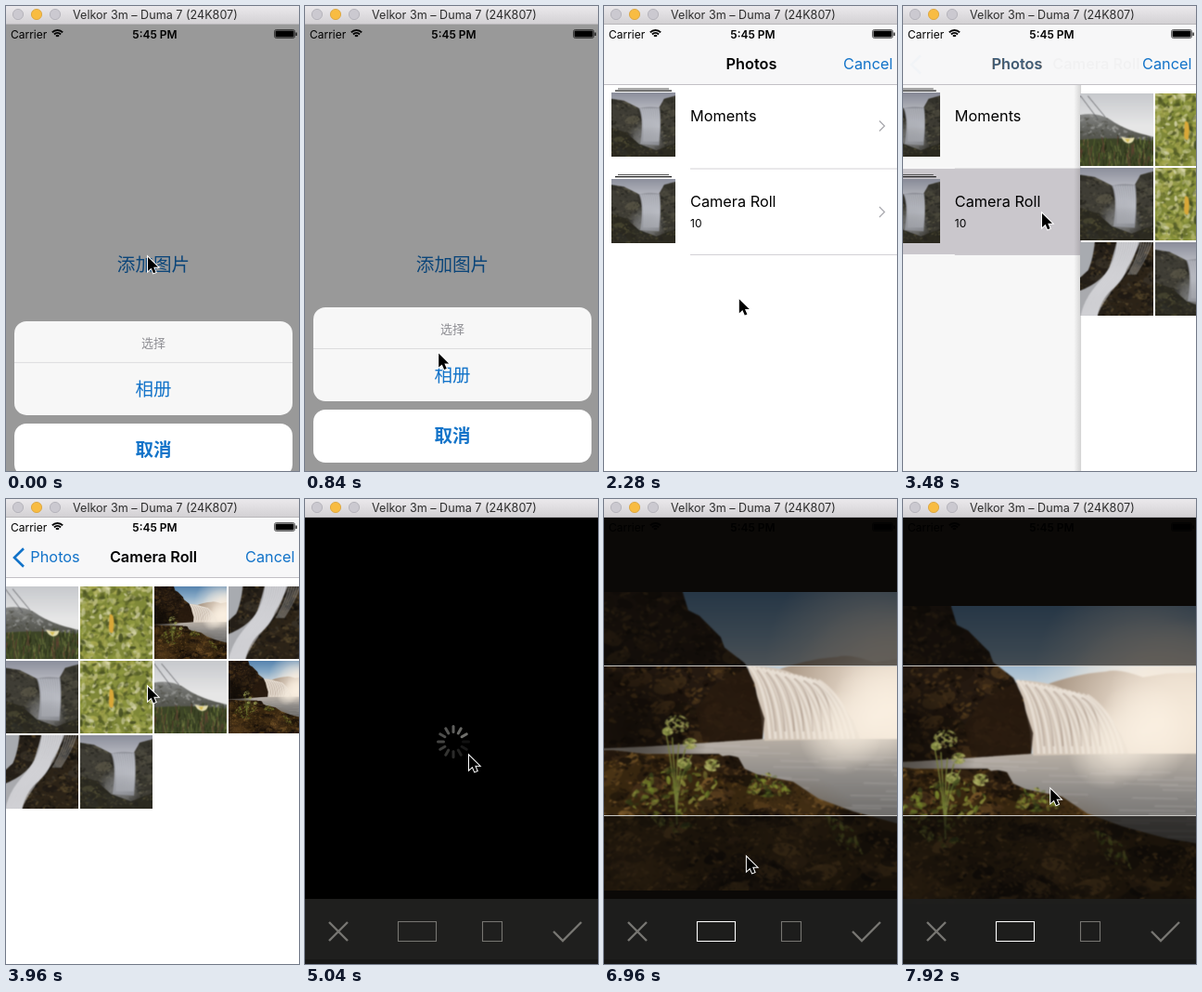
Animation of 316x500 px, one loop 8 s. Source, as an HTML page with a canvas:

```html
<!DOCTYPE html>
<html lang="en">
<head>
<meta charset="utf-8">
<title>Photo picker</title>
<style>
  html, body { margin: 0; width: 100%; height: 100%; overflow: hidden; background: #fff; }
  canvas { display: block; width: 316px; height: 500px; }
</style>
</head>
<body>
<canvas id="stage"></canvas>
<script>
const W = 316, H = 500, LOOP = 8000, BLUE = '#1273c9';
const UI = 'Inter, sans-serif', CJK = '"Noto Sans CJK SC", "Noto Sans CJK", sans-serif';
const canvas = document.getElementById('stage');
const ratio = window.devicePixelRatio || 1;
canvas.width = W * ratio;
canvas.height = H * ratio;
const c = canvas.getContext('2d');
c.imageSmoothingQuality = 'high';

const clamp = v => Math.max(0, Math.min(1, v));
const mix = (a, b, p) => a + (b - a) * p;
const easeOut = (t, start, end) => 1 - (1 - clamp((t - start) / (end - start))) ** 2;
const smooth = p => p * p * (3 - 2 * p);

function random(seed) {
  return () => (seed = (seed * 16807) % 2147483647) / 2147483647;
}

// ---- Photos -------------------------------------------------------------

function photo(w, h, paint) {
  const cv = document.createElement('canvas');
  cv.width = w * 2;
  cv.height = h * 2;
  const g = cv.getContext('2d');
  g.scale(2, 2);
  paint(g, random(w * 31 + h));
  // Lay a soft copy on top so that the flat shapes blend.
  g.filter = 'blur(1.6px)';
  g.drawImage(cv, 0, 0, w, h);
  return cv;
}

function gradient(g, y0, y1, ...colors) {
  const fill = g.createLinearGradient(0, y0, 0, y1);
  colors.forEach((color, i) => fill.addColorStop(i / (colors.length - 1), color));
  return fill;
}

function shape(g, d, fill) {
  g.fillStyle = fill;
  g.fill(new Path2D(d));
}

function glow(g, x, y, r, rgb, alpha) {
  const fill = g.createRadialGradient(x, y, 0, x, y, r);
  fill.addColorStop(0, `rgba(${rgb},${alpha})`);
  fill.addColorStop(.5, `rgba(${rgb},${alpha * .6})`);
  fill.addColorStop(1, `rgba(${rgb},0)`);
  g.fillStyle = fill;
  g.fillRect(x - r, y - r, 2 * r, 2 * r);
}

// Scatter small tilted blots inside a path.
function speckle(g, rnd, d, [x, y, w, h], count, size, colors, tilt = 1) {
  g.save();
  g.clip(new Path2D(d));
  for (let i = 0; i < count; i++) {
    g.fillStyle = colors[Math.floor(rnd() * colors.length)];
    g.globalAlpha = .35 + rnd() * .5;
    g.beginPath();
    const r = size * (.3 + rnd());
    g.ellipse(x + rnd() * w, y + rnd() * h, r, r * .5, (rnd() - .5) * 2 * tilt, 0, 7);
    g.fill();
  }
  g.restore();
}

// Dark mass with broad lumps, lit grains and deep cracks.
function rock(g, rnd, d, box, base, lights, darks, grain) {
  const area = box[2] * box[3], count = area / (grain * grain * 3);
  shape(g, d, base);
  speckle(g, rnd, d, box, count / 14, grain * 5, [...lights, ...darks, ...darks], .6);
  speckle(g, rnd, d, box, count, grain, [...lights, ...darks]);
}

function strokes(g, count, color, width, line) {
  g.strokeStyle = color;
  g.lineWidth = width;
  for (let i = 0; i < count; i++) {
    g.beginPath();
    line(i / (count - 1));
    g.stroke();
  }
}

const sunset = photo(480, 320, (g, rnd) => {
  g.fillStyle = gradient(g, 0, 95, '#5582ad', '#86a9c6', '#cdd6dc');
  g.fillRect(0, 0, 480, 320);
  glow(g, 375, 75, 120, '246,238,226', .8);
  shape(g, 'M262 86Q300 72 332 70Q345 66 372 76L398 72L480 70V175H262Z', '#ad9b89');
  glow(g, 390, 125, 115, '250,238,224', 1);
  glow(g, 440, 120, 110, '246,234,218', 1);
  g.fillStyle = gradient(g, 156, 250, '#b9b0a6', '#8a8784', '#666563');
  g.fillRect(0, 158, 480, 162);
  strokes(g, 40, 'rgba(205,201,196,.16)', 2, p => {
    const x = 130 + rnd() * 300, y = 164 + p * 85;
    g.moveTo(x, y);
    g.lineTo(x + 40 + rnd() * 60, y + 1);
  });
  shape(g, 'M235 79Q268 80 285 88Q316 94 338 122Q352 140 356 158L254 160Q250 112 235 79Z', '#d3c6b8');
  strokes(g, 16, 'rgba(255,250,243,.45)', 3, p => {
    g.moveTo(237 + p * 75, 79 + p * 16);
    g.quadraticCurveTo(256 + p * 85, 100 + p * 14, 260 + p * 90, 158);
  });
  strokes(g, 7, 'rgba(120,98,80,.3)', 2, p => {
    g.moveTo(246 + p * 60, 84 + p * 14);
    g.quadraticCurveTo(263 + p * 62, 106, 266 + p * 60, 150);
  });
  glow(g, 335, 152, 45, '246,236,222', .75);
  glow(g, 372, 135, 55, '250,240,226', .8);

  const earth = ['#66481f', '#49321a', '#7d5a2b'], deep = ['#0f0a06', '#1a120a', '#24180d'];
  const cliff = 'M0 0H166L172 20L184 26L207 49L211 60L233 77L243 98L251 136L252 158L192 162L130 166L0 172Z';
  rock(g, rnd, cliff, [0, 0, 255, 170], '#241910', ['#4e371b', '#3a2814', '#5c421f'], deep, 3);
  shape(g, 'M180 128L200 100L236 82L254 136L252 158L188 161Z', 'rgba(40,27,15,.85)');
  glow(g, 110, 145, 85, '10,7,4', .7);

  const shore = 'M0 172L90 170L126 174L205 174L228 188L246 196L285 204L312 222L350 236L398 249L480 262V320H0Z';
  rock(g, rnd, shore, [0, 168, 480, 152], '#37260f', earth, deep, 2.8);
  glow(g, 120, 298, 60, '112,78,36', .45);
  glow(g, 290, 265, 70, '100,70,34', .35);
  ['M186 314Q210 280 256 284Q286 298 292 320H180Z', 'M220 248Q244 226 272 234L286 250Q252 258 220 248Z',
    'M196 190Q204 170 226 178L236 196Q212 200 196 190Z'].forEach(d =>
    rock(g, rnd, d, [180, 170, 120, 150], '#2b1d0f', ['#4d361b', '#5e4320'], deep, 2.4));

  const greens = ['#7f8c2f', '#5b6a22', '#989c42', '#37431a', '#2f3514'];
  strokes(g, 5, '#747b38', 1.3, p => {
    g.moveTo(160, 250);
    g.quadraticCurveTo(158, 205, 148 + p * 28, 150 + p * 25);
  });
  [[160, 142, 13], [174, 163, 8], [198, 186, 9], [150, 150, 6], [168, 184, 8]].forEach(([x, y, r]) =>
    speckle(g, rnd, `M${x - r} ${y}a${r} ${r * .75} 0 1 0 ${2 * r} 0a${r} ${r * .75} 0 1 0 ${-2 * r} 0`,
      [x - r, y - r, 2 * r, 2 * r], 90, 2.4, ['#9a9e52', '#77823a', '#b7b56c']));
  speckle(g, rnd, 'M104 226L132 194L175 180L205 204L188 228L180 252L150 262L134 244Z', [104, 180, 100, 82], 240, 4, greens, 1.5);
  speckle(g, rnd, 'M234 216L244 194L264 194L284 216L262 222Z', [234, 194, 50, 28], 110, 3, greens, 1.5);
  speckle(g, rnd, 'M318 238L336 246L350 256L360 282L334 274Z', [318, 238, 42, 44], 90, 3.2, greens, 1.5);
});

const meadow = photo(100, 100, (g, rnd) => {
  g.fillStyle = gradient(g, 0, 45, '#c6c8cc', '#e6e6e6');
  g.fillRect(0, 0, 100, 100);
  const hill = 'M0 30Q22 26 40 36Q62 52 100 60V100H0Z';
  shape(g, hill, gradient(g, 26, 72, '#8a8b8a', '#63645f', '#4a4b42'));
  speckle(g, rnd, hill, [0, 28, 100, 44], 220, 2.5, ['#8e8f8b', '#585850', '#9b9c99', '#45463c']);
  strokes(g, 2, '#55565a', .8, p => { g.moveTo(p * 10, 4); g.lineTo(24 + p * 10, 36 - p * 3); });
  shape(g, 'M0 64Q50 60 100 66V100H0Z', '#3c4426');
  for (const color of ['#58672f', '#757d42', '#272d17', '#5f4131', '#454f28'])
    strokes(g, 40, color, 1, () => {
      const x = rnd() * 100, y = 70 + rnd() * 34;
      g.moveTo(x, y);
      g.lineTo(x + rnd() * 6 - 3, y - 7 - rnd() * 7);
    });
  shape(g, 'M56 60Q65 63 74 61Q73 69 65 69Q58 67 56 60Z', '#e4dcae');
  shape(g, 'M61 63h7l-3 5z', '#d5bd55');
});

const leaves = photo(100, 101, (g, rnd) => {
  g.fillStyle = '#7f8838';
  g.fillRect(0, 0, 100, 101);
  speckle(g, rnd, 'M0 0H100V101H0Z', [0, 0, 100, 101], 520, 5,
    ['#a9ac58', '#8f993f', '#535c24', '#c9c78a', '#424a20', '#aead52', '#d8d6ae'], 1.6);
  shape(g, 'M41 40Q46 37 47 49L46 64Q41 67 40 58Z', '#d9a838');
});

const stream = photo(101, 100, (g, rnd) => {
  const all = 'M0 0H101V100H0Z', lights = ['#4a3c28', '#5a4a2c', '#3b352a'], darks = ['#110f0c', '#1b1712', '#26211a'];
  rock(g, rnd, all, [0, 0, 101, 100], '#241e17', lights, darks, 2.4);
  shape(g, 'M50 0H82Q74 20 64 36Q60 52 42 66Q28 80 24 100H0V66Q30 54 40 34Q46 16 50 0Z', '#a9aaae');
  shape(g, 'M0 0H20Q18 22 11 38L0 48Z', '#a8abb0');
  strokes(g, 9, 'rgba(245,246,250,.5)', 2.6, p => {
    g.moveTo(52 + p * 26, 0);
    g.bezierCurveTo(48 + p * 20, 50, 12 + p * 30, 55, 2 + p * 20, 100);
  });
  rock(g, rnd, 'M42 68L66 42L82 22L101 12V100H30Z', [30, 12, 71, 88], '#2c2317', lights, darks, 2.4);
  strokes(g, 5, 'rgba(220,222,226,.35)', 2, p => {
    g.moveTo(84 + p * 14, 0);
    g.quadraticCurveTo(80 + p * 12, 20, 66 + p * 10, 44);
  });
});

const falls = photo(102, 102, (g, rnd) => {
  g.fillStyle = gradient(g, 0, 30, '#8b8e9b', '#bcbdc4');
  g.fillRect(0, 0, 102, 102);
  const lights = ['#5b5848', '#4d4a3e'], darks = ['#26251f', '#32312a'];
  rock(g, rnd, 'M0 10L20 13L44 25L76 24L84 10L102 5V102H0Z', [0, 5, 102, 97], '#3f3d35', lights, darks, 2.4);
  shape(g, 'M44 25Q60 21 77 24Q80 50 76 84L46 82Q52 45 44 25Z', gradient(g, 24, 84, '#90929a', '#a9abb2', '#7e8086'));
  strokes(g, 9, 'rgba(222,224,232,.38)', 2.6, p => {
    g.moveTo(47 + p * 27, 25);
    g.quadraticCurveTo(54 + p * 23, 40, 52 + p * 22, 78);
  });
  glow(g, 55, 76, 32, '160,162,168', .7);
  rock(g, rnd, 'M0 56L24 64L44 82L72 92L102 80V102H0Z', [0, 56, 102, 46], '#2c2a20', ['#49452f', '#545036'], darks, 2.2);
});

const roll = [meadow, leaves, sunset, stream, falls, leaves, meadow, sunset, stream, falls];

function thumb(img, x, y, size) {
  const side = Math.min(img.width, img.height);
  c.drawImage(img, (img.width - side) / 2, (img.height - side) / 2, side, side, x, y, size, size);
}

// ---- Drawing helpers ----------------------------------------------------

function rect(x, y, w, h, fill) {
  c.fillStyle = fill;
  c.fillRect(x, y, w, h);
}

function panel(x, y, w, h, r, fill) {
  c.fillStyle = fill;
  c.beginPath();
  c.roundRect(x, y, w, h, r);
  c.fill();
}

function text(str, x, y, size, color, { weight = 400, align = 'left', family = UI } = {}) {
  c.font = `${weight} ${size}px ${family}`;
  c.textAlign = align;
  c.textBaseline = 'middle';
  c.fillStyle = color;
  c.fillText(str, x, y);
}

function line(d, color, width) {
  c.strokeStyle = color;
  c.lineWidth = width;
  c.stroke(new Path2D(d));
}

function at(x, y, draw, alpha = 1) {
  c.save();
  c.translate(x, y);
  c.globalAlpha *= alpha;
  draw();
  c.restore();
}

// ---- Screens ------------------------------------------------------------

function titleBar() {
  rect(0, 0, W, 20, gradient(c, 0, 20, '#ebe9ec', '#d2d0d3'));
  rect(0, 19, W, 1, '#b9b7ba');
  ['#cbc9d0', '#f8bc42', '#cbc9d0'].forEach((color, i) => {
    c.beginPath();
    c.arc(13 + 20 * i, 9, 5.6, 0, 7);
    c.fillStyle = color;
    c.fill();
    c.strokeStyle = i === 1 ? '#d9a035' : '#aeacb4';
    c.lineWidth = .8;
    c.stroke();
  });
  text('Velkor 3m – Duma 7 (24K807)', 72, 10, 12.6, '#2c2c2c');
}

function statusBar() {
  text('Carrier', 5, 31, 12, '#000');
  text('5:45 PM', 160.5, 31, 12, '#000', { weight: 600, align: 'center' });
  [2, 5, 8].forEach(r => {
    c.beginPath();
    c.arc(55.5, 34, r, -Math.PI * .75, -Math.PI * .25);
    c.strokeStyle = '#000';
    c.lineWidth = 2;
    c.stroke();
  });
  c.beginPath();
  c.roundRect(289.5, 25.5, 22, 9, 2);
  c.lineWidth = .6;
  c.stroke();
  panel(290.5, 26.5, 20, 7, 1, '#000');
  rect(312.5, 28.5, 1.2, 3.5, '#000');
}

function actionSheet(y, pressed) {
  at(0, y, () => {
    panel(9, 324, 300, 101, 13, 'rgba(250,250,250,.97)');
    if (pressed) panel(9, 369, 300, 56, [0, 0, 13, 13], '#e2e1e4');
    rect(9, 368, 300, 1, '#dcdcde');
    const centered = { align: 'center', family: CJK };
    text('选择', 159, 347, 13, '#8f8f94', centered);
    text('相册', 159, 397, 19.5, BLUE, { ...centered, weight: 500 });
    panel(9, 434, 300, 57, 13, '#fff');
    text('取消', 159, 462, 19.5, BLUE, { ...centered, weight: 700 });
  });
}

function albumRow(y, name, count, selected) {
  if (selected) rect(0, y, W, 92, '#d0cdd3');
  rect(15, y + 6, 55, 1, '#555');
  rect(12, y + 8, 61, 1.3, '#222');
  thumb(falls, 8, y + 10.5, 69);
  text(name, 93, y + 36.5, 16.3, '#000');
  if (count) text(count, 93, y + 59.5, 12, '#000');
  line(`M297 ${y + 41}l5.5 5.5l-5.5 5.5`, '#a9a9ae', 1.3);
  rect(93, y + 92, W, 1, '#d3d1d6');
}

function navBar(push) {
  rect(0, 20, W, 64, '#f7f7f8');
  rect(0, 84, W, 1, '#c2c0c5');
  const title = { weight: 600, align: 'center' };
  const fade = smooth(push), arrive = push ** 4, x = mix(159, 53, fade), y = 63;
  at(x, y, () => text('Photos', 0, 0, 16.3, '#000', title), 1 - fade);
  at(x, y, () => text('Photos', 0, 0, 16.3, BLUE, { align: 'center' }), fade);
  at(0, y, () => line('M19 -9.7L9 0L19 9.7', BLUE, 2.6), arrive);
  at(mix(240, 159, push), y, () => text('Camera Roll', 0, 0, 16.3, '#000', title), arrive);
  text('Cancel', 258, y, 16.3, BLUE);
}

function picker(t) {
  const push = easeOut(t, 3393, 3793);
  rect(0, 20, W, 480, '#fff');
  at(-95 * push, 0, () => {
    albumRow(82.5, 'Moments');
    albumRow(175, 'Camera Roll', '10', t > 3220);
  });
  if (push > 0) {
    const x = W * (1 - push);
    rect(0, 84, x, 416, `rgba(0,0,0,${.08 * push})`);
    at(x, 0, () => {
      const shadow = c.createLinearGradient(-8, 0, 0, 0);
      shadow.addColorStop(0, 'rgba(0,0,0,0)');
      shadow.addColorStop(1, `rgba(0,0,0,${.25 * (1 - push)})`);
      rect(-8, 84, 8, 416, shadow);
      rect(0, 84, W, 416, '#fff');
      roll.forEach((img, i) => thumb(img, -.8 + 80.3 * (i % 4), 93.5 + 80.4 * Math.floor(i / 4), 78.5));
    });
  }
  navBar(push);
}

function spinner(t) {
  const head = 2 + Math.floor((t - 5000) / 83.4);
  for (let i = 0; i < 12; i++) {
    const age = (((head - i) % 12) + 12) % 12;
    at(160, 261, () => {
      c.rotate(i * Math.PI / 6);
      panel(-1.5, -18, 3, 9, 1.5, `rgba(150,150,146,${.75 - age * .058})`);
    });
  }
}

function cropper(t) {
  const loaded = t > 5150;
  rect(0, 20, W, 480, loaded ? '#0c0b09' : '#000');
  const square = t > 5720 && t < 6680;
  if (loaded) {
    const grow = easeOut(t, 5720, 5870);
    const zoom = mix(2 / 3, 1, grow);
    const half = 80.5 * (1 + grow - easeOut(t, 6680, 6880));
    const drag = t > 7200 ? cursorAt(t) : [192, 296];
    const w = 482 * zoom, h = 321 * zoom;
    c.drawImage(sunset, 159 - w / 2 + drag[0] - 192, 260 - h / 2 + drag[1] - 296, w, h);
    rect(0, 20, W, 240 - half, 'rgba(10,9,8,.62)');
    rect(0, 260 + half, W, 240 - half, 'rgba(10,9,8,.62)');
    line(`M0 ${260 - half}H316M0 ${260 + half}H316`, '#c9c8c5', 1);
  } else spinner(t);
  rect(0, 430, W, 70, loaded ? 'rgba(31,31,30,.96)' : '#1f1f1e');
  rect(0, 495, W, 5, '#181817');
  const idle = '#777672';
  line('M26 455L46 475M46 455L26 475M268 465L278 475L298 455', idle, 2.4);
  line('M100.5 454.5h41v21h-41z', loaded && !square ? '#fff' : idle, 1.1);
  line('M191.5 454.5h21v21h-21z', square ? '#fff' : idle, 1.1);
}

// ---- Pointer ------------------------------------------------------------

const pointerPath = [
  [0, 153, 270], [240, 153, 270], [1080, 142, 399], [1700, 142, 399], [2900, 150, 223],
  [3620, 150, 223], [3960, 153, 202], [4380, 196, 138], [4560, 196, 138], [5040, 177, 276],
  [5640, 197, 465], [5960, 197, 465], [6540, 120, 464], [6740, 120, 464], [7200, 192, 296], [7960, 159, 312]
];

function cursorAt(t) {
  const i = pointerPath.findIndex(key => key[0] > t);
  if (i < 0) return [159, 312];
  const [t0, x0, y0] = pointerPath[i - 1], [t1, x1, y1] = pointerPath[i];
  const p = smooth((t - t0) / (t1 - t0));
  return [mix(x0, x1, p), mix(y0, y1, p)];
}

function pointer(t) {
  at(...cursorAt(t), () => {
    const arrow = 'M0 0V15L3.6 11.8L6 17.3L8.6 16.2L6.2 10.8H11Z';
    line(arrow, '#fff', 2);
    shape(c, arrow, '#000');
  });
}

// ---- Timeline -----------------------------------------------------------

function draw(t) {
  c.setTransform(ratio, 0, 0, ratio, 0, 0);
  rect(0, 0, W, H, '#fff');
  text('添加图片', 159, 278, 19.6, BLUE, { align: 'center', family: CJK });

  const rise = easeOut(t, 1430, 1920);
  const enter = easeOut(t, 4540, 4940);
  if (rise > 0 && enter < 1) at(-95 * enter, 480 * (1 - rise), () => picker(t));

  const leave = easeOut(t, 1420, 1860);
  if (leave < 1) {
    rect(0, 20, W, 480, `rgba(2,0,0,${.4 * (1 - leave)})`);
    actionSheet(15 * (1 - easeOut(t, 0, 240)) + 190 * leave, t > 1260 && t < 1420);
  }
  if (enter > 0) at(W * (1 - enter), 0, () => cropper(t));

  statusBar();
  titleBar();
  pointer(t);
}

const begin = performance.now();
function frame() {
  draw((performance.now() - begin) % LOOP);
  requestAnimationFrame(frame);
}
frame();
</script>
</body>
</html>
```
